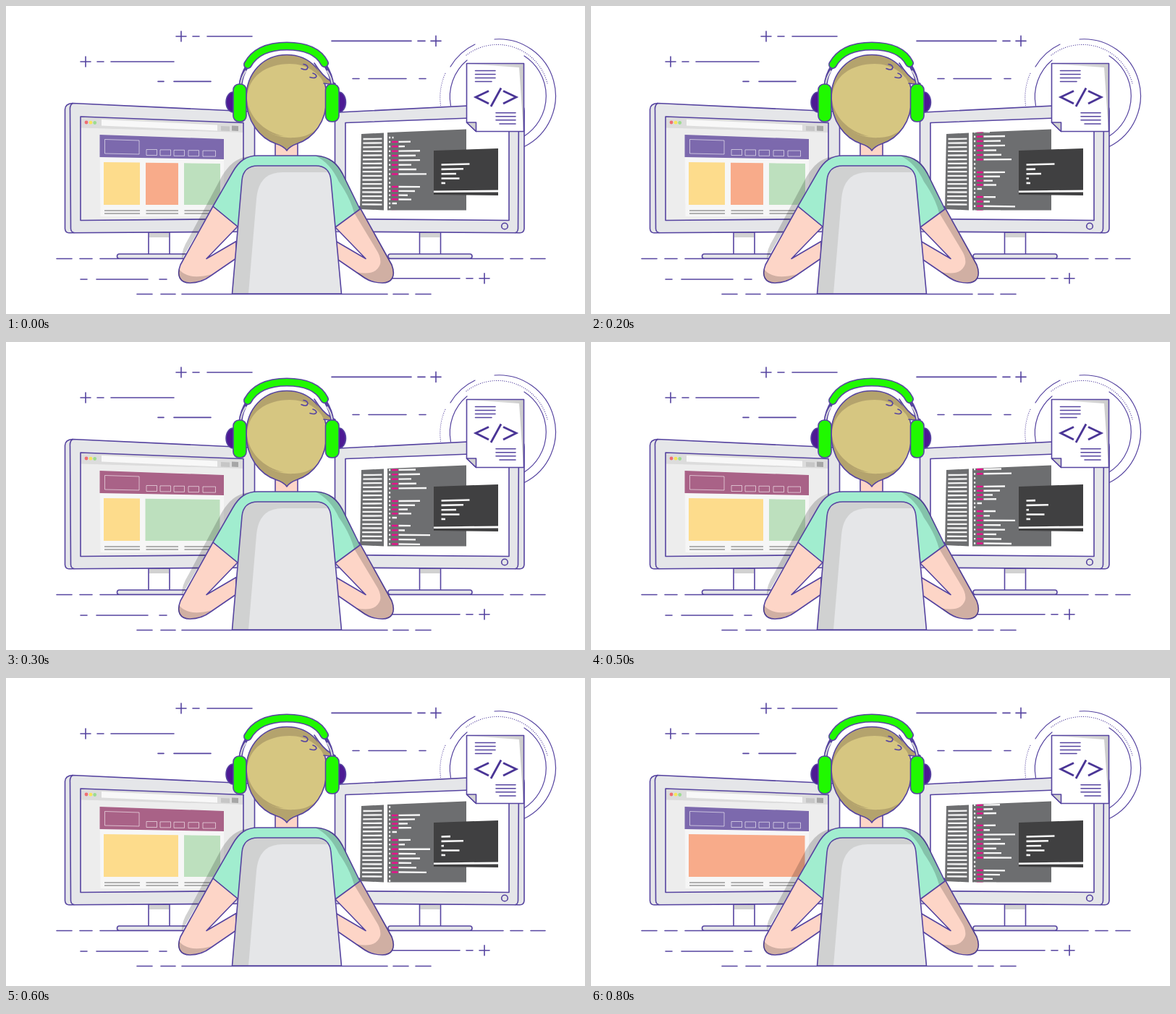
Animation of 800 by 426 pixels, one loop 900 ms. Source, as an HTML page:

```html
<!DOCTYPE html>
<html lang="en">
<head>
<meta charset="utf-8">
<title>Developer at work</title>
<style>
  html, body { margin: 0; width: 100%; height: 100%; overflow: hidden; background: #fff; }
  svg { display: block; width: 100%; height: 100%; }
  .ink { stroke: #5644a0; stroke-width: 1.6; stroke-linejoin: round; stroke-linecap: round; }
  .thin { stroke-width: 1.2; }
  .line { fill: none; }
  .metal { fill: #e5e6e9; }
  .skin { fill: #fdd5c7; }
  .shirt { fill: #a1edcf; }
  .shade { fill: #000; fill-opacity: .18; }
  .green { fill: #20f900; }
</style>
</head>
<body>
<svg viewBox="0 0 800 426">
  <defs>
    <clipPath id="codeClip"><path d="M527 175L636 170.500V282.500H527Z"/></clipPath>
    <path id="headShape" d="M388 67.500C355 67.500 332 93 332 127C332 160 351 183 373 190.500Q384 194 388 200Q392 194 402 190.500C425 183 443 160 443 127C443 93 421 67.500 388 67.500Z"/>
    <clipPath id="headClip"><use href="#headShape"/></clipPath>
    <linearGradient id="paper" x1="0" x2="1" y1="0" y2="0">
      <stop offset="0" stop-color="#eee"/><stop offset="1" stop-color="#ccc"/>
    </linearGradient>
  </defs>

  <!-- Background dashes, pluses and rings -->
  <path id="dashes" class="ink line"/>
  <g class="ink thin line">
    <path d="M675 46A78.500 78.500 0 0 1 716 194.500M614 84A78.500 78.500 0 0 1 648 53"/>
    <path d="M614.500 138A66 66 0 0 1 637 75M716 69A66 66 0 0 1 716 180"/>
    <path d="M636 68A71 71 0 0 1 748 107M601 140A80 80 0 0 1 608 91" stroke-dasharray=".1 2.700"/>
  </g>

  <!-- Monitor stands -->
  <g id="stand">
    <path class="ink" fill="#fff" d="M197 313H226V344H197Z"/>
    <path class="shade" d="M198 314H225V320H198Z"/>
    <rect class="ink metal" x="153.500" y="343" width="116" height="6.300" rx="3.100"/>
  </g>
  <use href="#stand" x="374.500"/>

  <!-- Left monitor -->
  <path class="ink metal" d="M92 134.500L338 146Q343.500 146.500 343.500 152V312L87 313.800Q82 313.800 81.500 308V143Q82 135 92 134.500Z"/>
  <path class="ink line" d="M92 134.500Q88 137 88.500 144L89.500 308Q90 313 94 313.500"/>
  <path fill="#ededed" d="M103 153L328 161.500V294.500L103 296.500Z"/>
  <path fill="#dcdcdc" d="M103 153L328 161.500V175L103 168.500Z"/>
  <path fill="#f8f8f8" d="M132 157L292 164.500V172.500L132 165.500Z"/>
  <path fill="#c6c6c6" d="M297 166L309 166.400V173L297 172.600Z"/>
  <path fill="#a6a6a6" d="M312 165.500L321 166V173L312 172.600Z"/>
  <circle cx="111" cy="161" r="2.400" fill="#ef6d72"/>
  <circle cx="117" cy="161.200" r="2.400" fill="#f7e65a"/>
  <circle cx="122.700" cy="161.500" r="2.400" fill="#9cdc91"/>
  <path fill="#f6f6f6" d="M129.500 178L301 184V291H130.500Z"/>
  <path id="banner" d="M129.500 178L301 184V212L129.500 209Z"/>
  <path id="bannerBoxes" fill="none" stroke="#fff" stroke-opacity=".58"/>
  <g id="blocks"></g>
  <path fill="none" stroke="#999" stroke-width="1.700" d="M136 283H185M136 287H185M193.500 283H238M193.500 287H238M246.500 283H295M246.500 287H295"/>
  <path class="ink line" d="M103 153L328 161.500V294.500L103 296.500Z"/>

  <!-- Right monitor -->
  <path class="ink metal" d="M460 147L708 134.500Q716 136 716 145V308Q715.500 313.800 710 313.800L454.500 312V153Q454.500 147.500 460 147Z"/>
  <path class="ink line" d="M706 135Q708.500 138 708.500 144L707.500 308Q707 313 704 313.500"/>
  <path class="ink" fill="#fff" d="M469 161.500L695 153V296.500L469 294.500Z"/>
  <circle class="ink line" cx="689" cy="304.500" r="4.300"/>
  <path fill="#6d6e70" d="M491 177L522 175.500V282.500L489 281Z"/>
  <path id="fileList" fill="none" stroke="#f4f4f4" stroke-width="2.300"/>
  <path fill="#6d6e70" d="M527 175L636 170.500V282.500H527Z"/>
  <g clip-path="url(#codeClip)" fill="none" stroke-width="2.400">
    <path id="keywords" stroke="#e6128b"/>
    <path id="code" stroke="#f6f6f6"/>
  </g>
  <path fill="#404041" d="M591 200L680 197V262L591 261Z"/>
  <path id="terminal" fill="none" stroke="#f6f6f6" stroke-width="2.600"/>
  <path fill="#fff" d="M591 255.500L680 254.500V257.500L591 258Z"/>

  <!-- Document -->
  <path fill="#fff" d="M636.500 79.500H715.500V173.500H649.500L636.500 161Z"/>
  <path fill="url(#paper)" d="M637 80H715V173L709 85Z"/>
  <path class="ink line" d="M636.500 79.500H715.500V173.500H649.500L636.500 161Z"/>
  <path class="ink" fill="#d2d2d2" d="M636.500 161H649.500V173.500Z"/>
  <path class="ink line" d="M648.500 89.500H676M648.500 94.500H676M648.500 99.500H676M648.500 104.500H671M677 147.800H704M677 152.800H704M677 157.800H704M682 163H704"/>
  <path class="line" stroke="#4a3596" stroke-width="2.800" d="M667 117.500L649 126L667 135M684 113.500L670 139M687 117.500L705 126L687 135"/>

  <!-- Body -->
  <path class="shade" d="M348 207C320 207 309 218 298 236L252 322Q242 338 243 350L286 277L318 222Z"/>
  <path id="arm" class="ink skin" d="M286 277L241 358C235 374 241 383 254 383Q270 383 283 373L318 349V325.500L277 349.500L320 305Z"/>
  <use href="#arm" transform="matrix(-1 0 0 1 774 0)"/>
  <path class="shade" d="M239 364Q252 380 284 371Q268 383 254 382.500C241 382 236 374 239 364Z"/>
  <path class="shade" d="M481 286L489 280L533 358C539 374 533 383 520 382.500Q506 382 492 374L484 368Q511 374 517 357Q519 348 511 336Z"/>
  <path class="ink skin" d="M372 188H403V212H372Z"/>
  <path class="ink shirt" d="M348 207H428C448 208 458 219 465 232L489 281L455 306L388 310L320 305L286 277L313 230C322 214 332 207 348 207Z"/>
  <path class="shade" d="M428 207.500C448 208 458 219 465 232L488 281L481 286Q475 264 460 243Q448 217 428 207.500Z"/>

  <!-- Chair -->
  <path fill="#d0d1d1" d="M312.500 398L326 241Q328 221 348 221H428Q447 221 449 241L463.500 398Z"/>
  <path fill="#e5e6e8" d="M335 398L346 267Q349 230 382 230H447L449 241L463 398Z"/>
  <path class="ink line" d="M312.500 398L326 241Q328 221 348 221H428Q447 221 449 241L463.500 398Z"/>

  <!-- Head -->
  <use href="#headShape" fill="#b4a36d"/>
  <path clip-path="url(#headClip)" fill="#d6c681" d="M333 128C334 97 360 80 392 80C415 80 433 92 443 112V145C438 168 420 182 398 182C384 183 370 179 360 173Q372 180 384 180C355 174 335 152 333 128Z"/>
  <use href="#headShape" class="ink line"/>
  <path class="ink" fill="#b4a36d" d="M426 79Q438 98 449 104L455 107.500Q449 109 439 107"/>
  <path class="ink line" d="M408 86.500Q416 90 417 85Q416 81 411 80.500M420 98.500Q428 101 429 97Q428 94 424 93"/>

  <!-- Headphones -->
  <g fill="none" stroke-linecap="round">
    <path stroke="#5644a0" stroke-width="5" d="M334 82Q325 96 324 110M440 80Q450 96 451 110"/>
    <path stroke="#5644a0" stroke-width="12" d="M334 81Q348 55.500 388 55.500Q428 55.500 440 79"/>
    <path stroke="#20f900" stroke-width="8.800" d="M334 81Q348 55.500 388 55.500Q428 55.500 440 79"/>
    <path stroke="#ddd" stroke-width="2" d="M331 90Q325 99 324 110M444 90Q450 99 451 110"/>
  </g>
  <ellipse class="ink" fill="#4d1994" cx="314" cy="133" rx="10" ry="14"/>
  <ellipse class="ink" fill="#4d1994" cx="460" cy="133" rx="9.500" ry="14"/>
  <rect class="ink green" x="314" y="108" width="18" height="52" rx="8"/>
  <rect class="ink green" x="441.500" y="108" width="18.500" height="52" rx="8"/>
</svg>
<script>
const el = id => document.getElementById(id);
const setPath = (id, parts) => el(id).setAttribute('d', parts.join(''));
const bar = (x1, x2, y, slope = 0) => `M${x1} ${y}L${x2} ${y + slope * (x2 - x1)}`;
const plus = (x, y) => `M${x - 7} ${y}h14M${x} ${y - 7}v14`;

// Each row: y, then start and end of every dash
const dashRows = [
  [77, 126, 135, 145, 232], [42, 258, 267, 278, 340],
  [48.4, 450, 560, 569, 579], [104.4, 210, 218, 232, 283],
  [100.5, 479, 488, 501, 553, 571, 580],
  [349.5, 70, 91, 102, 119, 130, 248, 526, 687, 697, 714, 725, 745],
  [378, 103, 112, 125, 196, 212, 222], [376.8, 528, 627, 636, 645],
  [398.5, 181, 202, 214, 234, 243, 527, 535, 556, 566, 587],
];
setPath('dashes', [
  ...dashRows.flatMap(([y, ...xs]) =>
    xs.map((x, i) => i % 2 ? `H${x}` : `M${x} ${y}`)),
  plus(110, 77), plus(242, 42), plus(594, 48.4), plus(661, 376.8),
]);

setPath('bannerBoxes', [
  'M136.500 184.500L184 186V205L136.500 204Z',
  ...[194, 213, 232, 252, 272].map((x, i) => {
    const width = i < 4 ? 14.5 : 17.5;
    return `M${x} ${198.5 + i * .4}h${width}v8h${-width}Z`;
  }),
]);
setPath('fileList', Array.from({ length: 17 }, (_, i) =>
  bar(493.5 - i * .1, 519.5, 184 + i * 5.65, (i - 11) * .001)));

// Browser layouts: [left, right, colour] for each block
const yellow = '#fddc8c', orange = '#f8ab8a', green = '#bde0be';
const layouts = [
  [[135, 185, yellow], [193, 238, orange], [246, 296, green]],
  [[135, 185, yellow], [192.5, 295.5, green]],
  [[135, 238, yellow], [246, 296, green]],
  [[135, 295.5, orange]],
];
const blockTop = x => 216 + (x - 135) * .012;

// Right ends of the code lines in the two repeating paragraphs
const longPart = [559, 551, 586, 566, 572, 560, 567, 581];
const shortPart = [572, 565, 555, 560];
const period = 96;

function drawCode(scroll) {
  const keywords = [], code = [];
  const slope = y => (y - 237) * .0003;
  const dot = y => code.push(bar(529, 531.2, y));
  const row = (y, end) => {
    dot(y);
    keywords.push(bar(533, 541.5, y, slope(y)));
    code.push(bar(542.5, end, y + slope(y) * 9.5, slope(y)));
  };
  const bracket = (y, end) => { dot(y); code.push(bar(533.5, end, y, slope(y))); };

  bracket(182 - scroll, 535.5);
  for (let k = 0; k < 2; k++) {
    const top = 188 + k * period - scroll;
    longPart.forEach((end, i) => row(top + i * 6.35, k === 0 && i === 2 ? 572 : end));
    dot(top + 50.5);
    dot(top + 56.5);
    shortPart.forEach((end, i) => row(top + 62 + i * 5.8, end));
    bracket(top + 85, 540);
    dot(top + 90.5);
  }
  setPath('keywords', keywords);
  setPath('code', code);
}

const fullPrompt = [640.5, 632, 622, 626.5, 607];
const shortPrompt = [640.5, 614, 622, 605, 607];
const shiftedPrompt = [614, 632, 605, 626.5, 607];

let shown = -1;
function render() {
  const step = Math.floor(performance.now() % 900 / 100);
  if (step !== shown) {
    shown = step;
    const layout = step < 3 ? 0 : step < 5 ? 1 : step < 7 ? 2 : 3;
    el('banner').setAttribute('fill', layout === 1 || layout === 2 ? '#a96287' : '#7c69ad');
    el('blocks').innerHTML = layouts[layout].map(([a, b, fill]) =>
      `<path fill="${fill}" d="M${a} ${blockTop(a)}L${b} ${blockTop(b)}V275H${a}Z"/>`).join('');
    drawCode(step * 10);
    const prompt = step === 1 || step === 2 ? shortPrompt
      : step >= 5 && step <= 7 ? shiftedPrompt : fullPrompt;
    setPath('terminal', prompt.map((end, i) =>
      bar(601.5, end, 219.5 + i * 6.35, (i - 3) * .009)));
  }
  requestAnimationFrame(render);
}
render();
</script>
</body>
</html>
```
